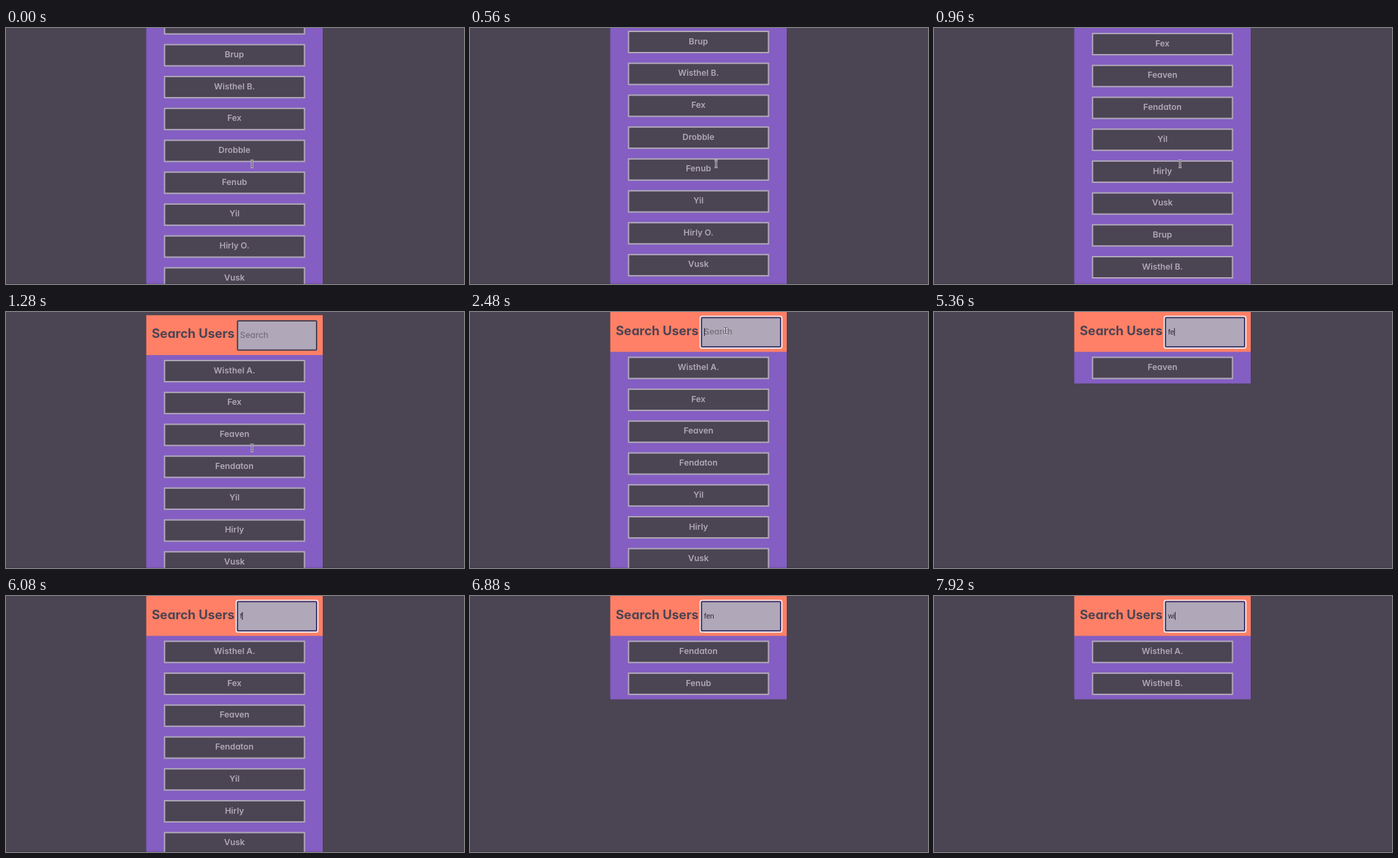
An HTML page for the animation above (8 s loop, 671 px wide and 375 px high).

```html
<!DOCTYPE html>
<html lang="en">
<head>
<meta charset="utf-8">
<title>Search Users</title>
<style>
  html, body { margin: 0; width: 100%; height: 100%; overflow: hidden; background: #4b4453; }
  svg { display: block; width: 671px; height: 375px; }
  text { font: 600 12.3px Inter, sans-serif; font-feature-settings: "cv11"; }
  .title { font-size: 18.5px; font-weight: 700; fill: #4b4453; }
  .name { text-anchor: middle; fill: #b0a8b9; }
  .placeholder { font-weight: 500; fill: #75707b; }
  .typed { font: 10.5px "Liberation Sans", sans-serif; fill: #2b2731; }
</style>
</head>
<body>
<svg id="stage" viewBox="0 0 671 375"></svg>
<script>
const LOOP = 8000, STEP = 80, BLINK = 480, FILTER_DELAY = 80;
const FOCUS_AT = 2320, POINTER_HIDDEN_AT = 3120;
const DARK = '#4b4453', LIGHT = '#b0a8b9', ORANGE = '#ff8066', PURPLE = '#845ec2';
const ROW_TOP = 65.4, ROW_PITCH = 46.7, ROW_HEIGHT = 33;

const users = [
  'Wisthel A.', 'Fex', 'Feaven', 'Fendaton', 'Yil', 'Hirly', 'Vusk', 'Brup',
  'Wisthel B.', 'Fex', 'Drobble', 'Fenub', 'Yil', 'Hirly O.', 'Vusk', 'Brup'
];

// [time, value]
const scrollKeys = [
  [0, 368.9], [560, 388.3], [640, 388.3], [720, 381], [800, 322], [880, 215],
  [960, 105], [1040, 25], [1120, -12], [1200, -9], [1280, -4.7], [1360, -2], [1520, 0]
];
const typing = [
  [0, ''], [3120, 'f'], [3600, 'fe'], [4400, 'fea'], [5360, 'fe'], [5600, 'f'], [5760, ''],
  [6080, 'f'], [6160, 'fe'], [6240, 'fen'], [6960, 'fe'], [7120, 'f'], [7280, ''],
  [7680, 'w'], [7840, 'wi']
];

const stage = document.getElementById('stage');
const mix = (a, b, p) => a + (b - a) * p;
const progress = (t, from, to) => Math.min(1, Math.max(0, (t - from) / (to - from)));
const smooth = p => p * p * (3 - 2 * p);
const latest = (keys, t) => keys.filter(k => k[0] <= t).pop();

function scrollAt(t) {
  const next = scrollKeys.findIndex(k => k[0] > t);
  if (next < 0) return 0;
  const [t0, y0] = scrollKeys[next - 1], [t1, y1] = scrollKeys[next];
  return mix(y0, y1, progress(t, t0, t1));
}

const rect = (x, y, w, h, fill, extra = '') =>
  `<rect x="${x}" y="${y}" width="${w}" height="${h}" fill="${fill}" ${extra}/>`;
const text = (x, y, kind, value) => `<text x="${x}" y="${y}" class="${kind}">${value}</text>`;

function row(name, i) {
  const y = ROW_TOP + i * ROW_PITCH;
  return rect(232.3, y + 1, 205, ROW_HEIGHT - 2, DARK, `stroke="${LIGHT}" stroke-width="2"`) +
    text(334.7, y + 19.6, 'name', name);
}

function list(query) {
  const shown = users.filter(name => name.toLowerCase().startsWith(query));
  return rect(205.5, 58, 258.5, shown.length * ROW_PITCH, PURPLE) + shown.map(row).join('');
}

function field(t, query, changedAt) {
  const focused = t >= FOCUS_AT;
  const border = focused ? '#443f70' : DARK;
  const ring = focused
    ? rect(337.3, 6.3, 119.6, 46.6, 'none', 'rx="2.5" stroke="#f8f0f2" stroke-width="1.7"') : '';
  return ring +
    rect(339.2, 8.2, 115.8, 42.8, LIGHT, `rx="1" stroke="${border}" stroke-width="2"`) +
    (query ? text(343, 33, 'typed', query) : text(342.7, 33.3, 'placeholder', 'Search'));
}

function caret(t, changedAt) {
  const since = t - Math.max(FOCUS_AT, changedAt);
  if (since < 0 || Math.floor(since / BLINK) % 2) return;
  const typed = stage.querySelector('.typed');
  const x = 343 + (typed ? typed.getComputedTextLength() : 0);
  stage.insertAdjacentHTML('beforeend', rect(x, 23.5, 1, 11.5, '#2b2731'));
}

function pointer(t) {
  if (t >= POINTER_HIDDEN_AT) return '';
  const p = smooth(progress(t, 1540, 2200));
  const beam = 'M-2.5-5 Q0-5 0-3.5 Q0-5 2.5-5 M0-3.5V3.5 M-2.5 5 Q0 5 0 3.5 Q0 5 2.5 5';
  return `<g transform="translate(${mix(360.5, 374.5, p)} ${mix(199, 27, p)})" fill="none">
    <path d="${beam}" stroke="#e8e4ec" stroke-width="2.6"/>
    <path d="${beam}" stroke="#302b36" stroke-width="1"/></g>`;
}

function draw(t) {
  const [changedAt, query] = latest(typing, t);
  const filter = latest(typing, Math.max(0, t - FILTER_DELAY))[1];
  stage.innerHTML =
    `<g transform="translate(0 ${-scrollAt(t)})">` +
      list(filter) +
      rect(205.5, 0, 258.5, 58.4, ORANGE) +
      text(213.5, 33.8, 'title', 'Search Users') +
      field(t, query) +
    '</g>' +
    rect(0, 373.5, 671, 1.5, '#000', 'opacity=".1"') +
    pointer(t);
  caret(t, changedAt);
}

const start = performance.now();
let drawn = -1;
function tick() {
  const t = Math.floor(((performance.now() - start) % LOOP) / STEP) * STEP;
  if (t !== drawn) draw(drawn = t);
  requestAnimationFrame(tick);
}
tick();
</script>
</body>
</html>
```
